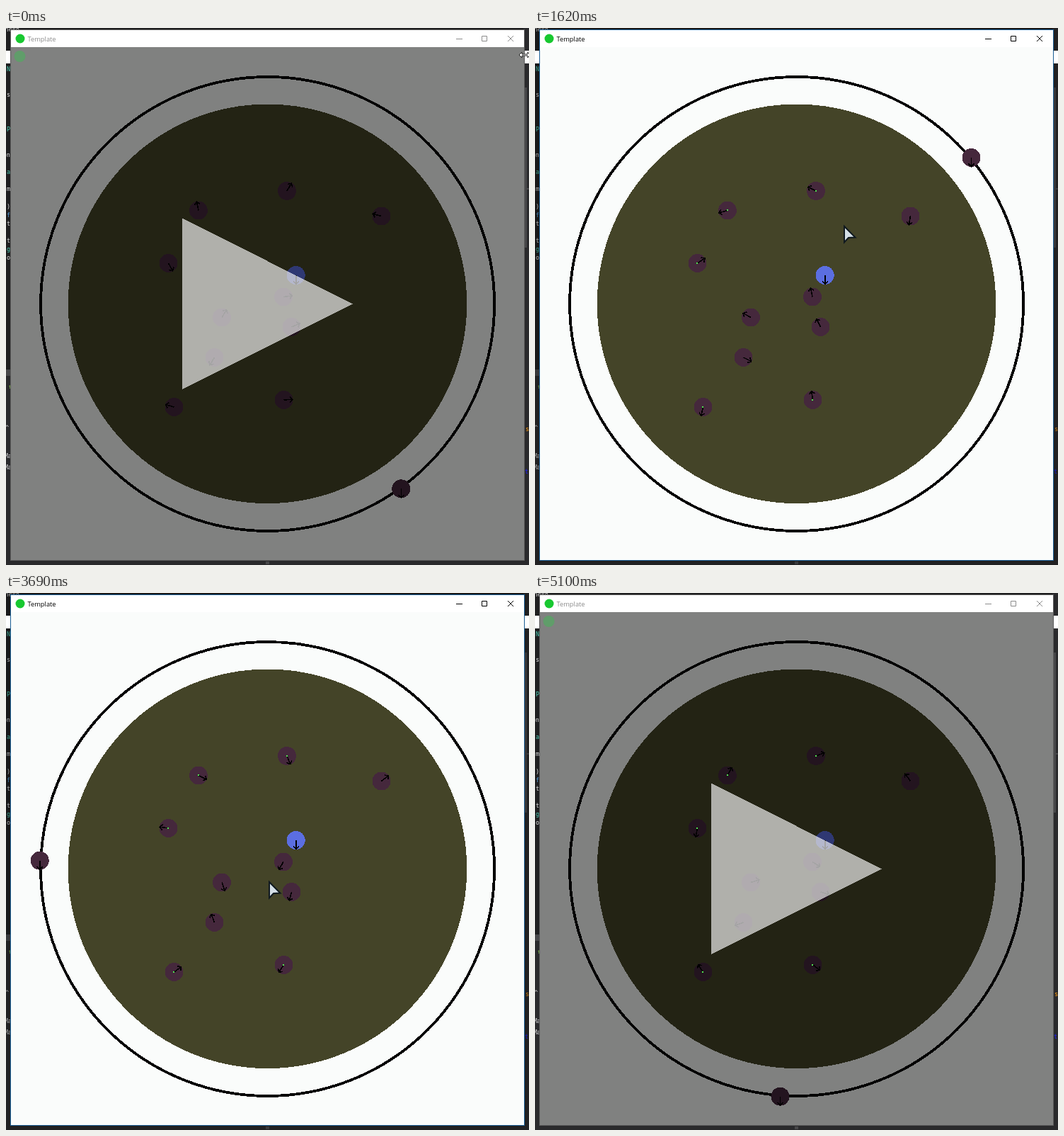
Animation, 739 px wide and 758 px high, one loop 5130 ms. Source, as an HTML page:

```html
<!DOCTYPE html>
<html>
<head>
<meta charset="utf-8">
<style>
html, body { margin: 0; width: 739px; height: 758px; overflow: hidden; background: #1f1f20; }
svg { display: block; }
.code { font: 8.5px "DejaVu Sans Mono", monospace; text-anchor: end; fill: #ddd; }
.type { fill: #4ec9b0; }
.keyword { fill: #569cd6; }
.title { font: 9.3px "Open Sans", "Noto Sans", sans-serif; }
.bar { color: #000; }
.border { fill: #1b5f96; }
.pause, .resize { display: none; }
.paused .bar { color: #8c8c8c; }
.paused .border { fill: #5c5c5c; }
.paused .pause, .grab .resize { display: inline; }
.paused .shadow, .grab .arrow { display: none; }
.crisp { shape-rendering: crispEdges; }
.hand { fill: none; stroke: #000; stroke-width: 1.6; }
</style>
</head>
<body>
<svg id="stage" width="739" height="758">
  <g fill="#2a2a2c">
    <rect y="491" width="9" height="267"/>
    <rect y="752" width="739" height="6"/>
    <rect x="731" width="8" height="758"/>
  </g>
  <g fill="#48484a">
    <rect y="482" width="9" height="9"/>
    <rect x="367" y="753" width="5" height="4"/>
    <rect x="733" y="84" width="3" height="226"/>
    <rect x="731" y="226" width="8" height="2"/>
  </g>
  <g class="code">
    <g id="listing"></g>
    <text x="19" y="5">neko</text>
    <text x="8" y="509" fill="#8ac850">↑</text>
    <text x="4" y="567">^</text>
    <text x="8" y="607">Ma</text>
    <text x="8" y="623">Ma</text>
    <text x="739" y="569" fill="#ff9c10">s</text>
    <text x="738" y="629" fill="#2020ff">t</text>
  </g>
  <rect class="shadow" width="739" height="758" opacity=".22"/>
  <rect y="32" width="739" height="18" fill="#fff"/>

  <rect class="border" x="6" y="2" width="727" height="750"/>
  <rect x="7" y="3" width="725" height="24" fill="#fff"/>
  <circle cx="20" cy="15" r="6.5" fill="#18c830"/>
  <g class="bar">
    <text class="title" x="30.5" y="18.5" fill="currentColor">Template</text>
    <path d="M636 15.5h9M672.5 11.5h7v7h-7zM709 11l8 8m0-8l-8 8" fill="none" stroke="currentColor"/>
  </g>

  <g class="crisp">
    <rect x="7" y="27" width="725" height="724" fill="#fafcfb"/>
    <circle cx="369.5" cy="389.3" r="281.8" fill="#444428"/>
    <circle cx="369.6" cy="389.5" r="320.5" fill="none" stroke="#000" stroke-width="3.8"/>
    <g id="balls"></g>
    <rect class="pause" x="7" y="27" width="725" height="724" opacity=".49"/>
    <path class="pause" d="M249 268.5L490 389.5L249 510z" fill="#fff" opacity=".645"/>
    <g id="marks" fill="#50e050"></g>
  </g>
  <circle class="pause" cx="19.5" cy="40" r="8" fill="#30c848" opacity=".4"/>

  <g id="pointer">
    <path class="arrow" d="M1 2V24.5L7 18L16.5 17.5z" fill="#d4dfe6" stroke="#10191f" stroke-width="2"/>
    <path class="resize" d="M-8 0l4-4v3h8v-3l4 4l-4 4v-3h-8v3z" fill="#fff" stroke="#222"/>
  </g>
</svg>
<script>
const $ = id => document.getElementById(id);
const LOOP = 5130, STEP = 30;
const START = 7, STOP = 167;   // steps between which everything turns
const CX = 369.5, CY = 389.5, ORBIT = 322;

// x, y and first heading of each spinner
const spinners = [
  [397, 230, -60], [272, 257.5, -102], [530.5, 265.5, -166], [229.5, 332, 61],
  [392, 379.5, -7], [305, 408.5, -58], [403.5, 422, -23], [294.5, 465, 121],
  [237.5, 535, -164], [392.5, 525, -4]
];

// time, x, y where the pointer changes course
const course = [
  [0, 733, 38], [930, 516, 272], [1620, 436, 278], [2460, 320, 430],
  [3690, 371, 406], [4320, 668, 74], [4680, 731, 28], [LOOP, 760, 28]
];

function add(parent, markup) {
  parent.insertAdjacentHTML('beforeend', markup);
  return parent.lastElementChild;
}

function ball(x, y, heading, color = '#45283c') {
  return add($('balls'), `<g transform="translate(${x} ${y})">
    <circle r="13" fill="${color}"/>
    <path class="hand" d="M0 0H12.5M8.5 -4L12.5 0L8.5 4" transform="rotate(${heading})"/></g>`);
}

// One entry per line of code; only the line ends stick out
'N,,,s,,,,P,,,on,,a,,m,,),f,t,,t,g,o'.split(',').forEach((text, row) => {
  const kind = /[NPag]/.test(text) ? 'type' : text === 'f' ? 'keyword' : '';
  add($('listing'), `<text class="${kind}" x="6" y="${61 + 12.1 * row}">${text}</text>`);
});

const hands = spinners.map(([x, y, heading]) => {
  const reach = Math.hypot(x - CX, y - CY);
  if (reach > 120 && reach < 200) {
    add($('marks'), `<rect x="${Math.floor(x) - 1}" y="${Math.floor(y) - 1}" width="2" height="2"/>`);
  }
  return ball(x, y, heading).lastElementChild;
});
ball(409.7, 349, 90, '#5b6ee1');
const orbiter = ball(0, 0, 90);

const move = (node, x, y) => node.setAttribute('transform', `translate(${x} ${y})`);

function movePointer(t) {
  const i = course.findIndex(p => p[0] > t);
  const [t0, x0, y0] = course[i - 1], [t1, x1, y1] = course[i];
  const k = (t - t0) / (t1 - t0);
  move($('pointer'), x0 + (x1 - x0) * k, y0 + (y1 - y0) * k);
}

function draw(now) {
  const step = Math.floor(now % LOOP / STEP);
  const turn = 2 * (Math.max(START, Math.min(STOP, step)) - START);
  const angle = (54.1 - turn) * Math.PI / 180;
  const stage = $('stage').classList;
  stage.toggle('paused', step < START || step > STOP);
  stage.toggle('grab', step < 3);
  $('marks').style.opacity = step < START ? 0 : 1;
  hands.forEach((hand, i) => hand.setAttribute('transform', `rotate(${spinners[i][2] - turn})`));
  move(orbiter, CX + ORBIT * Math.cos(angle), CY + ORBIT * Math.sin(angle));
  movePointer(step * STEP);
  requestAnimationFrame(t => draw(Math.max(0, t - start)));
}

const start = performance.now();
draw(0);
</script>
</body>
</html>
```
